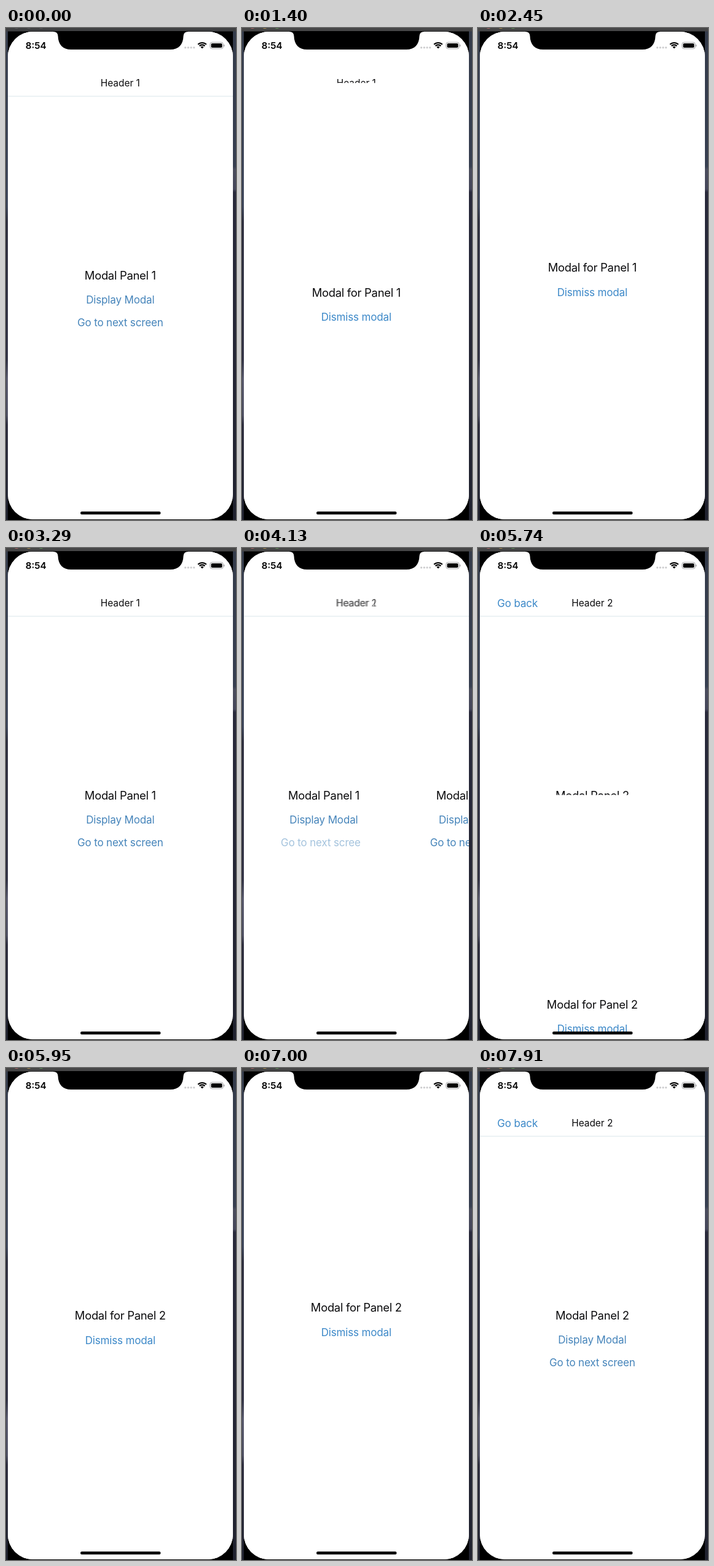
Write an HTML page with a canvas that moves like this. It is 374x800 px and loops after 8 s.

```html
<!DOCTYPE html>
<html lang="en">
<head>
<meta charset="utf-8">
<title>Modal and stack navigation</title>
<style>
  html, body { margin: 0; width: 100%; height: 100%; overflow: hidden; background: #000; }
  canvas { display: block; width: 374px; height: 800px; }
</style>
</head>
<body>
<canvas id="stage"></canvas>
<script>
const W = 374, H = 800, LOOP = 8000;
const LEFT = 3, TOP = 6, RIGHT = 369, BOTTOM = 799, MID = 185.8;
const SAFE_TOP = 49, HEADER_BOTTOM = 111, TRAVEL = 792;
const STEEL = '#4584ba', BLUE = '#3b88c8', INK = '#0b0b0d';
const FAMILY = 'Inter, "Liberation Sans", Arial, sans-serif';

const canvas = document.getElementById('stage');
const ctx = canvas.getContext('2d');
const dpr = window.devicePixelRatio || 1;
canvas.width = W * dpr;
canvas.height = H * dpr;

const clamp = v => Math.max(0, Math.min(1, v));
const mix = (a, b, p) => a + (b - a) * p;

// Critically damped spring, 0 before start and 1 at rest
function spring(t, start) {
  const x = (t - start) / 1000 * 20;
  if (x <= 0) return 0;
  return x > 9.5 ? 1 : 1 - (1 + x) * Math.exp(-x);
}

// Opacity of a button pressed at `down` and released at `up`
function pressed(t, down, up) {
  if (t < down) return 1;
  const low = mix(1, 0.2, clamp((Math.min(t, up) - down) / 150));
  return mix(low, 1, clamp((t - up) / 250));
}

function text(str, x, y, size, color, { align = 'center', weight = 400, spacing = 0, alpha = 1 } = {}) {
  ctx.save();
  ctx.globalAlpha *= alpha;
  ctx.font = `${weight} ${size}px ${FAMILY}`;
  ctx.letterSpacing = spacing + 'px';
  ctx.textAlign = align;
  ctx.fillStyle = color;
  ctx.fillText(str, x, y);
  ctx.restore();
}

const title = (str, y) => text(str, MID, y, 18.4, INK, { spacing: -0.28 });
const link = (str, y, color, alpha, x = MID, align = 'center') =>
  text(str, x, y, 17, color, { spacing: -0.15, alpha, align });

function rect(x, y, w, h, color) {
  ctx.fillStyle = color;
  ctx.fillRect(x, y, w, h);
}

function pill(x, y, w, h, r, color) {
  ctx.beginPath();
  ctx.roundRect(x, y, w, h, r);
  ctx.fillStyle = color;
  ctx.fill();
}

function dot(x, y, r, color) {
  ctx.beginPath();
  ctx.arc(x, y, r, 0, Math.PI * 2);
  ctx.fillStyle = color;
  ctx.fill();
}

function strip(x, w, stops) {
  const g = ctx.createLinearGradient(0, 0, 0, H);
  stops.forEach(([y, c]) => g.addColorStop(y / H, c));
  rect(x, 0, w, H, g);
}

function backdrop(active) {
  strip(0, LEFT, [[0, '#363d4c'], [290, '#3a4358'], [315, '#2a2b3b'], [540, '#2e2f42'],
    [570, '#55566a'], [630, '#4c4d60'], [645, '#29293a'], [H, '#20222f']]);
  strip(RIGHT, W - RIGHT, [[0, '#343b4a'], [225, '#363e50'], [230, '#4a4c5c'], [262, '#44465a'],
    [267, '#28293a'], [H, '#20222f']]);
  rect(LEFT, 5, RIGHT - LEFT, H - 5, '#000');
  rect(0, 0, W, 5.5, active ? '#464647' : '#3f4042');
  const lights = active ? ['#b5686a', '#b3934f', '#5f9a58'] : ['#59595b', '#59595b', '#59595b'];
  lights.forEach((c, i) => dot(17 + i * 20, -5, 6, c));
}

function panel(n, x, display, next) {
  ctx.save();
  ctx.translate(x, 0);
  rect(LEFT, HEADER_BOTTOM + 1, RIGHT - LEFT, BOTTOM - HEADER_BOTTOM, '#fff');
  title('Modal Panel ' + n, 408.7);
  link('Display Modal', 448, STEEL, display);
  link('Go to next screen', 485, STEEL, next);
  ctx.restore();
}

function header(p) {
  rect(LEFT, TOP, RIGHT - LEFT, HEADER_BOTTOM - TOP, '#fff');
  rect(LEFT, HEADER_BOTTOM - 0.5, RIGHT - LEFT, 1, '#d9e6ea');
  if (p < 1) text('Header 1', MID, 95.3, 15.4, INK, { alpha: 1 - p });
  if (p > 0) {
    text('Header 2', MID, 95.3, 15.4, INK, { alpha: p });
    link('Go back', 96, BLUE, clamp(p * 2 - 1), 31.3, 'left');
  }
}

function modal(n, offset, dismiss) {
  if (offset >= TRAVEL) return;
  ctx.save();
  ctx.translate(0, offset);
  rect(LEFT, SAFE_TOP, RIGHT - LEFT, H, '#fff');
  title('Modal for Panel ' + n, 396.2);
  link('Dismiss modal', 435.5, BLUE, dismiss);
  ctx.restore();
}

function notch() {
  ctx.beginPath();
  ctx.moveTo(77, 5);
  ctx.lineTo(77, 6);
  ctx.quadraticCurveTo(84, 6, 84.5, 13);
  ctx.bezierCurveTo(85, 27, 92, 35, 106, 35);
  ctx.lineTo(267, 35);
  ctx.bezierCurveTo(281, 35, 288, 27, 288.5, 13);
  ctx.quadraticCurveTo(289, 6, 296, 6);
  ctx.lineTo(296, 5);
  ctx.fillStyle = '#000';
  ctx.fill();
}

function wifi(x, y) {
  ctx.strokeStyle = '#000';
  ctx.lineWidth = 2.1;
  const a = Math.PI / 4;
  for (const r of [9.6, 6.2]) {
    ctx.beginPath();
    ctx.arc(x, y, r, -Math.PI / 2 - a, -Math.PI / 2 + a);
    ctx.stroke();
  }
  ctx.beginPath();
  ctx.moveTo(x, y);
  ctx.arc(x, y, 3.6, -Math.PI / 2 - a, -Math.PI / 2 + a);
  ctx.fillStyle = '#000';
  ctx.fill();
}

function statusBar() {
  text('8:54', 48.7, 33.8, 15.2, '#000', { weight: 600 });
  for (let i = 0; i < 4; i++) dot(291.6 + i * 4.7, 31.8, 1.6, '#cbcbcd');
  wifi(319, 33.6);
  ctx.beginPath();
  ctx.roundRect(331.8, 23.3, 21.4, 10.4, 3.2);
  ctx.strokeStyle = '#a2a2a4';
  ctx.lineWidth = 1;
  ctx.stroke();
  pill(333.5, 25, 18, 7, 1.8, '#000');
  pill(354, 26.8, 1.4, 3.6, [0, 1.4, 1.4, 0], '#a2a2a4');
}

function draw(t) {
  const push = spring(t, 4050);
  const up1 = spring(t, 1165), down1 = spring(t, 2590);
  const up2 = spring(t, 5648), down2 = spring(t, 7235);
  const width = RIGHT - LEFT;

  ctx.setTransform(dpr, 0, 0, dpr, 0, 0);
  backdrop(t >= 840);

  ctx.save();
  ctx.beginPath();
  ctx.roundRect(LEFT, TOP, width, BOTTOM - TOP, 41);
  ctx.clip();
  rect(0, 0, W, H, '#fff');
  if (push < 1) panel(1, -0.3 * width * push, pressed(t, 840, 1150), pressed(t, 3300, 4040));
  if (push > 0) panel(2, width * (1 - push), pressed(t, 4890, 5630), 1);
  header(push);
  modal(1, TRAVEL * (1 - up1 + down1), pressed(t, 2450, 2580));
  modal(2, TRAVEL * (1 - up2 + down2), pressed(t, 7000, 7225));
  rect(0, 0, W, SAFE_TOP, '#fff');
  ctx.restore();

  notch();
  statusBar();
  pill(121, 786.3, 130.5, 4.7, 2.3, '#000');
}

const begin = performance.now();
function tick() {
  draw((performance.now() - begin) % LOOP);
  requestAnimationFrame(tick);
}
tick();
</script>
</body>
</html>
```
